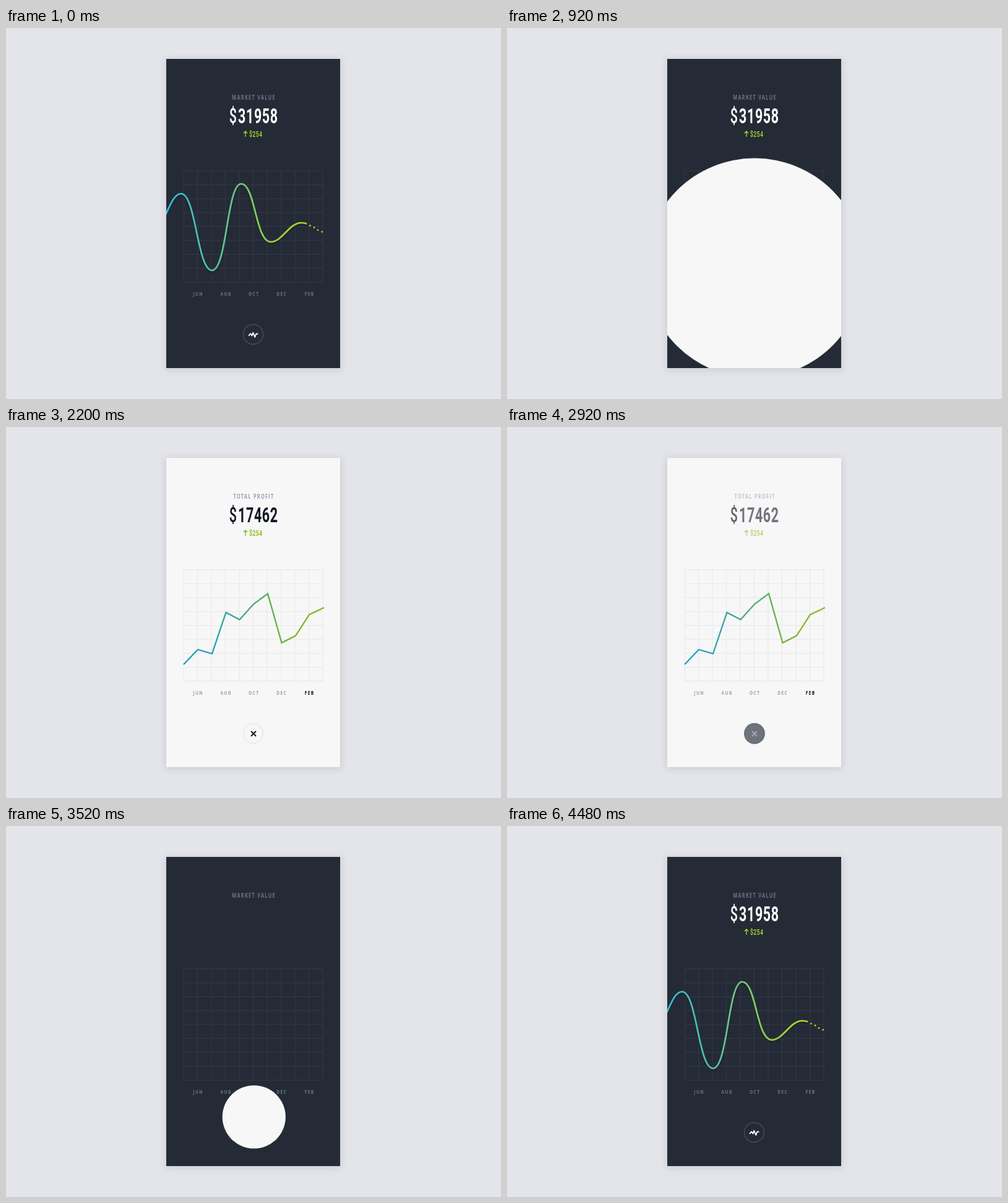
These frames come from a looping animation (800 by 600 pixels, 5.4 s). An HTML page:

```html
<!DOCTYPE html>
<html lang="en">
<head>
<meta charset="utf-8">
<title>Market value</title>
<style>
  html, body { margin: 0; width: 100%; height: 100%; overflow: hidden; background: #e4e5ea; }
  svg { display: block; width: 800px; height: 600px; }
  text { text-anchor: middle; }
  .label { font: 700 10px "Open Sans", sans-serif; letter-spacing: 1.8px; }
  .month { font-size: 9px; letter-spacing: 2px; }
  .value { font: 700 33px Roboto, sans-serif; letter-spacing: 1px; }
  .sign { font-weight: 500; }
  .delta { font: 500 13.5px Roboto, sans-serif; letter-spacing: .4px; }
  .line { fill: none; }
</style>
</head>
<body>
<svg viewBox="0 0 800 600">
  <defs>
    <clipPath id="card"><rect x="259" y="50" width="281" height="500"/></clipPath>
    <clipPath id="darkWipe"><rect id="darkRect" x="259" y="220" height="200"/></clipPath>
    <clipPath id="lightWipe"><rect id="lightRect" x="286" y="220" height="200"/></clipPath>
    <linearGradient id="neon" gradientUnits="userSpaceOnUse" x1="259" x2="486" y1="0" y2="0">
      <stop offset="0" stop-color="#35bbd6"/><stop offset=".33" stop-color="#55c2a6"/>
      <stop offset=".55" stop-color="#75c974"/><stop offset=".8" stop-color="#9bd33a"/>
      <stop offset="1" stop-color="#b0d92a"/>
    </linearGradient>
    <linearGradient id="deep" gradientUnits="userSpaceOnUse" x1="287" x2="513" y1="0" y2="0">
      <stop offset="0" stop-color="#1699c0"/><stop offset=".3" stop-color="#2ea5a0"/>
      <stop offset=".6" stop-color="#5bb052"/><stop offset=".8" stop-color="#7ab526"/>
      <stop offset="1" stop-color="#8cb91c"/>
    </linearGradient>
    <filter id="glow" x="-20%" y="-20%" width="140%" height="140%"><feGaussianBlur stdDeviation="6"/></filter>
    <filter id="drop" filterUnits="userSpaceOnUse" x="240" y="220" width="300" height="200">
      <feDropShadow dx="0" dy="2" stdDeviation="1.5" flood-color="#000" flood-opacity=".35"/>
    </filter>
    <path id="grid"/>
    <path id="arrow" class="line" stroke-width="1.3" d="M387 176V167M384 170.3L387 167L390 170.3"/>
    <path id="pulse" class="line" stroke-width="1.8" stroke-linejoin="round" stroke-linecap="round"
      d="M392.5 497.3L395 494.3L397.6 497.6L399.2 492.6L402.4 499.8L404.4 494.4L406.8 494.6"/>
  </defs>

  <rect x="257" y="50" width="285" height="503" fill="#252b36" opacity=".13" filter="url(#glow)"/>
  <g clip-path="url(#card)">
    <rect x="259" y="50" width="281" height="500" fill="#252b36"/>
    <g id="dark">
      <use href="#grid" stroke="#303641"/>
      <g class="labels" data-title="MARKET VALUE" fill="#6f747e"></g>
      <g class="figure" fill="#fff" data-accent="#a9dc2e"></g>
      <g clip-path="url(#darkWipe)">
        <path class="line" stroke="url(#neon)" stroke-width="2.7" filter="url(#drop)"
          d="M257 304C264 290 271 268 283 268C307 268 309 392 333 392C357 392 357 252 380 252C403 252 403 346 428 346C446 346 458 315 477 315Q482 315 486 316.5"/>
        <path class="line" stroke="#b4dc2a" stroke-width="2.8" stroke-linecap="round"
          d="M491.5 319.6h.01M498 322.7h.01M504 326.8h.01M510.8 329.6h.01"/>
      </g>
      <circle cx="399.5" cy="495.5" r="16" fill="none" stroke="#484e59" stroke-width="1.3"/>
      <use href="#pulse" stroke="#fff"/>
    </g>
    <circle id="disc" fill="#f7f7f7"/>
    <use id="inkPulse" href="#pulse" stroke="#252b36"/>

    <g id="light">
      <rect id="sheet" x="259" y="50" width="281" height="500" fill="#f7f7f7"/>
      <g id="frame">
        <use href="#grid" stroke="#ececee"/>
        <circle cx="399.5" cy="495.5" r="16" fill="none" stroke="#e6e7ea" stroke-width="1.3"/>
      </g>
      <g class="labels" data-title="TOTAL PROFIT" data-strong="FEB" fill="#9c9cad"></g>
      <g class="figure" fill="#111726" data-accent="#7fb50e"></g>
      <path class="line" clip-path="url(#lightWipe)" stroke="url(#deep)" stroke-width="2.3"
        d="M287 384L310 360L333 366.5L355.5 300L377.5 311.5L400 286.5L423 269.5L445.5 349L468 337.5L490 303.5L514 292"/>
      <circle id="press" cx="400" cy="495.7" r="17" fill="#252b36"/>
      <path id="cross" class="line" stroke-width="1.8" d="M396 492L404 500M404 492L396 500"/>
    </g>
  </g>
</svg>
<script>
const LOOP = 5400, STEP = 40;
const find = (q, root = document) => root.querySelector(q);
const set = (el, attrs) => { for (const k in attrs) el.setAttribute(k, attrs[k]); };
const fade = (el, v) => el.setAttribute('opacity', v);
const lerp = (a, b, p) => a + (b - a) * p;
const ramp = (t, a, b) => Math.min(1, Math.max(0, (t - a) / (b - a)));
const sine = (t, a, b) => (1 - Math.cos(Math.PI * ramp(t, a, b))) / 2;
const cubic = (t, a, b) => {
  const p = ramp(t, a, b);
  return p < .5 ? 4 * p ** 3 : 1 - 4 * (1 - p) ** 3;
};

let lines = '';
for (let i = 0; i <= 10; i++) lines += `M${287 + 22.5 * i} 230.5V411.5`;
for (let i = 0; i <= 8; i++) lines += `M286.5 ${231 + 22.5 * i}H513`;
set(find('#grid'), { d: lines, 'stroke-width': 1.4 });

// One condensed style for every piece of type
const type = (cls, x, y, scale, text, extra = '') =>
  `<text class="${cls}" transform="translate(${x} ${y}) scale(${scale} 1)" ${extra}>${text}</text>`;

for (const g of document.querySelectorAll('.labels')) {
  const { title, strong } = g.dataset;
  g.innerHTML = `<g class="title">${type('label', 400.6, 115.7, .73, title)}</g>` +
    ['JUN', 'AUG', 'OCT', 'DEC', 'FEB'].map((m, i) =>
      type('label month', 310.7 + 45 * i, 433.3, .73, m, m === strong ? 'fill="#0b0d16"' : '')).join('');
}
for (const g of document.querySelectorAll('.figure')) {
  const { accent } = g.dataset;
  g.innerHTML = type('value', 400.3, 154, .65,
    '<tspan class="sign">$</tspan><tspan class="digits" dx="2"></tspan>') +
    `<g class="gain" fill="${accent}"><use href="#arrow" stroke="${accent}"/>` +
    type('delta', 403.6, 175.8, .66, '$254') + '</g>';
}

const dark = find('#dark'), light = find('#light');
const disc = find('#disc'), cross = find('#cross');

function figure(layer, value, shown, gain) {
  find('.digits', layer).textContent = Math.round(value);
  fade(find('.value', layer), shown);
  fade(find('.gain', layer), gain);
}

function draw(t) {
  const closing = t >= 2000;

  // Disc grows from the button, later shrinks back into it
  const size = closing ? 1 - sine(t, 2880, 3703) : sine(t, 600, 1200);
  set(disc, {
    cx: lerp(400, closing ? 406.7 : 400.4, size),
    cy: lerp(closing ? 493 : 496, 301, size),
    r: lerp(17, 308, size),
    opacity: closing ? 1 - ramp(t, 3700, 3900) : ramp(t, 200, 400)
  });
  fade(find('#inkPulse'), closing ? 0 : ramp(t, 200, 400) * (1 - ramp(t, 600, 680)));

  // Dark page
  if (closing) {
    figure(dark, 31958 * sine(t, 3880, 4440), ramp(t, 3680, 3840), ramp(t, 4320, 4480));
  } else {
    figure(dark, 31958, 1, 1);
  }
  set(find('#darkRect'), { width: closing ? 257 * sine(t, 3740, 4480) : 257 });

  // Light page
  const leave = ramp(t, 2800, 3100), pressed = ramp(t, 2800, 2980);
  const labels = ramp(t, 1160, 1280);
  fade(light, 1 - cubic(t, 2800, 3380));
  fade(find('#sheet'), t >= 1180 ? 1 : 0);
  fade(find('#frame'), ramp(t, 1040, 1160));
  fade(find('.labels', light), labels);
  fade(find('.title', light), 1 - leave);
  figure(light, 17462 * sine(t, 1640, 2180), ramp(t, 1440, 1600), ramp(t, 2000, 2200) * (1 - leave));
  set(find('.digits', light), { 'fill-opacity': 1 - leave });
  set(find('.sign', light), { 'fill-opacity': 1 - .8 * leave });
  set(find('#lightRect'), { width: 229 * sine(t, 1518, 2200) });
  fade(find('#press'), pressed);
  const tone = lerp(13, 247, pressed);
  set(cross, { stroke: `rgb(${tone},${tone},${tone})`, opacity: labels });
}

function tick() {
  draw(Math.floor(performance.now() % LOOP / STEP) * STEP);
  requestAnimationFrame(tick);
}
tick();
</script>
</body>
</html>
```
